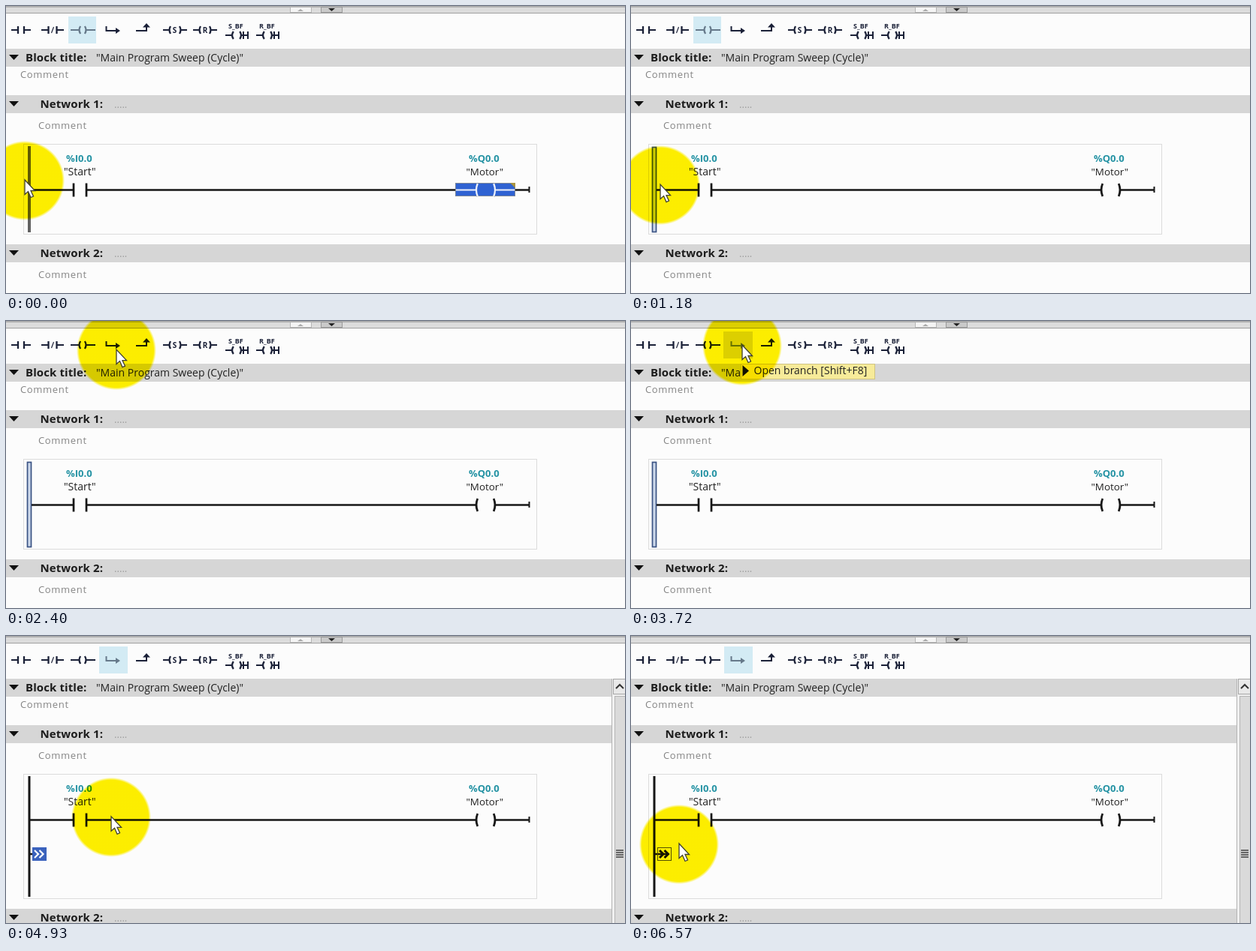
An HTML page with a canvas for the animation above (6.64 s loop, 824 by 383 pixels).

```html
<!DOCTYPE html>
<html lang="en">
<head>
<meta charset="utf-8">
<title>Ladder editor</title>
<style>
html, body { margin: 0; width: 100%; height: 100%; overflow: hidden; background: #fcfcfc; }
canvas { display: block; width: 824px; height: 383px; }
</style>
</head>
<body>
<canvas id="stage" width="824" height="383"></canvas>
<script>
const ctx = document.getElementById('stage').getContext('2d');
const LOOP = 6640;
const STEP = 133;
const INK = '#1b2138';
const BLACK = '#161616';
const FADED = '#66798a';
const BUTTON = '#d3ebf4';
const FONT = '"Open Sans", "Noto Sans", sans-serif';
const RUNG_Y = 245.5;

const EVENTS = {
  railSelected: 520, coilButtonOff: 2270, branchHover: 2530,
  tipOn: 2940, branchAdded: 4250, branchClicked: 5460
};

// Places the pointer visits: at the rail, on the toolbar, over the rung, at the branch
const STOPS = [
  { at: 0, x: 25, y: 232 },
  { at: 1180, x: 39, y: 238 },
  { at: 1860, x: 48, y: 260 },
  { at: 2400, x: 147, y: 38 },
  { at: 3720, x: 148, y: 32 },
  { at: 4450, x: 148, y: 36 },
  { at: 4930, x: 140, y: 241 },
  { at: 5710, x: 53, y: 299 },
  { at: 6500, x: 64, y: 277 }
];

const ease = k => k * k * (3 - 2 * k);

function pointerAt(t) {
  const i = STOPS.findIndex(s => s.at > t);
  if (i < 0) return STOPS[STOPS.length - 1];
  const a = STOPS[i - 1], b = STOPS[i];
  const k = ease((t - a.at) / (b.at - a.at));
  return { x: a.x + (b.x - a.x) * k, y: a.y + (b.y - a.y) * k };
}

function rect(x, y, w, h, color) {
  ctx.fillStyle = color;
  ctx.fillRect(x, y, w, h);
}

function frame(x, y, w, h, color, width = 1) {
  ctx.strokeStyle = color;
  ctx.lineWidth = width;
  ctx.strokeRect(x, y, w, h);
}

function trace(pts) {
  ctx.beginPath();
  for (let i = 0; i < pts.length; i += 2) ctx.lineTo(pts[i], pts[i + 1]);
}

function line(color, width, ...pts) {
  ctx.strokeStyle = color;
  ctx.lineWidth = width;
  trace(pts);
  ctx.stroke();
}

function poly(color, ...pts) {
  ctx.fillStyle = color;
  trace(pts);
  ctx.fill();
}

// Triangle centred on x, its tip at y + h (negative h points up)
function wedge(x, y, half, h, color) {
  poly(color, x - half, y, x + half, y, x, y + h);
}

function text(str, x, y, size, color = '#222', weight = 400, spacing = 0) {
  ctx.font = `${weight} ${size}px ${FONT}`;
  ctx.letterSpacing = spacing + 'px';
  ctx.fillStyle = color;
  ctx.fillText(str, x, y);
}

// Ladder element: leads from x0 to x1 around a symbol at cx; bow 0 makes a contact
function element(x0, x1, cx, y, { gap, h = 5, bow = 0, color = INK, width = 2 }) {
  line(color, width, x0, y, cx - gap, y);
  line(color, width, cx + gap, y, x1, y);
  ctx.lineWidth = width + 0.3;
  for (const side of [-1, 1]) {
    const x = cx + side * gap;
    ctx.beginPath();
    ctx.moveTo(x - side * bow, y - h);
    ctx.quadraticCurveTo(x + side * bow, y, x - side * bow, y + h);
    ctx.stroke();
  }
}

function topStrip() {
  rect(0, 0, 824, 9, '#dcdcdc');
  rect(0, 0, 824, 2, '#b0b0b0');
  rect(0, 9, 824, 1, '#a0a0a0');
  rect(378, 2, 28, 7, '#f4f4f4');
  frame(378.5, 1.5, 28, 7, '#b5b5b5');
  wedge(392, 7, 4, -3, '#aaa');
  rect(419, 2, 28, 7, '#c9c9c9');
  frame(419.5, 1.5, 28, 7, '#999');
  wedge(433.5, 3, 4.5, 4, '#222');
}

function letterCoil(x, letter) {
  element(x, x + 32, x + 16, 32, { gap: 7.5, bow: 1.5 });
  text(letter, x + 12.8, 36, 10, INK, 700);
}

function fieldCoil(x, label) {
  text(label, x + 4, 30, 9, INK, 700);
  element(x, x + 30, x + 15, 39, { gap: 6, bow: 1.8 });
  for (const bar of [24, 30]) line(INK, 2, x + bar, 34, x + bar, 44);
}

function toolbar(t) {
  const coilOn = t < EVENTS.coilButtonOff;
  const hover = t >= EVENTS.branchHover;
  if (coilOn) rect(83, 14, 37, 36, BUTTON);
  if (t >= EVENTS.branchAdded) rect(124, 14, 38, 36, BUTTON);
  else if (hover) rect(123, 14, 39, 36, '#dcdcdc');

  element(7, 33, 20, 32, { gap: 4 });
  element(47, 77, 62, 32, { gap: 5.5 });
  line(INK, 1.2, 60.5, 36, 63.5, 28);
  element(86, 119, 102, 32, { gap: 4.5, bow: 1.6, color: coilOn ? FADED : INK });

  const open = hover ? FADED : INK;
  line(open, 2, 133.5, 27, 133.5, 33, 148, 33);
  poly(open, 146, 29, 152, 33, 146, 37);
  line(INK, 2, 173, 33, 187, 33, 187, 27);
  wedge(187, 28.5, 5, -5.5, INK);

  letterCoil(209, 'S');
  letterCoil(249, 'R');
  fieldCoil(292, 'S_BF');
  fieldCoil(333, 'R_BF');
}

function header(y) {
  rect(0, y, 824, 24, '#d6d6d6');
  wedge(10.5, y + 8, 6.5, 7, '#111');
}

const comment = (x, y) => text('Comment', x, y, 13, '#858585', 400, 0.65);

function network(n, y) {
  header(y);
  text(`Network ${n}:`, 45.5, y + 17, 15, '#1c1c1c', 700, 0.1);
  text('.....', 144, y + 17, 13, '#999');
  comment(43, y + 45);
}

function rail(t) {
  if (t >= EVENTS.branchAdded) rect(29.5, 187, 3, 161, BLACK);
  else if (t < EVENTS.railSelected) rect(29, 187, 4, 115, '#626262');
  else {
    rect(28, 188, 6, 114, '#cbd7ea');
    frame(28.5, 188.5, 5, 113, '#3b5384', 1.7);
  }
}

function rung(t) {
  const coil = { gap: 12.5, h: 8.5, bow: 1.8, color: BLACK, width: 2.4 };
  const start = t >= EVENTS.branchAdded ? 31 : 34;
  element(start, 300, 98.5, RUNG_Y, { gap: 8.5, h: 9, color: BLACK, width: 2.4 });
  element(300, 697, 638.5, RUNG_Y, coil);
  line(BLACK, 2, 696.5, 241, 696.5, 249);

  if (t < EVENTS.railSelected) {
    rect(598, 236, 80, 18, '#2f62d2');
    frame(598.5, 236.5, 79, 17, '#7c8799');
    element(599, 677, 638.5, RUNG_Y, { ...coil, color: '#eef2fb', width: 2 });
    poly('#a8933f', 671, 236, 678, 236, 678, 243);
  }

  text('%I0.0', 80, 208, 13, '#2593a4', 700);
  text('"Start"', 77, 226, 14);
  text('%Q0.0', 616, 208, 13, '#2593a4', 700);
  text('"Motor"', 612.5, 226, 13.4);
}

function branch(t) {
  const clicked = t >= EVENTS.branchClicked;
  line(BLACK, 2.5, 31, 291, clicked ? 50 : 37, 291);
  if (clicked) frame(35.5, 282.5, 18, 17, '#555');
  else rect(35, 282, 19, 18, '#3a62bd');
  for (const x of [38, 44.5]) {
    line(clicked ? BLACK : '#fff', clicked ? 3 : 2.2, x, 286, x + 5, 291, x, 296);
  }
}

function scrollbar() {
  rect(806, 57, 18, 326, '#f0f0f0');
  rect(806, 57, 1, 326, '#b4b4b4');
  rect(808, 58, 16, 20, '#e9e9e9');
  frame(808.5, 57.5, 16, 20, '#a5a5a5');
  line('#333', 2, 812, 70, 817, 65, 822, 70);
  rect(810, 80, 14, 303, '#dadada');
  frame(810.5, 80.5, 14, 310, '#b5b5b5');
  for (let y = 285; y < 295; y += 3) rect(812, y, 10, 2, '#666');
}

function tooltip() {
  rect(146, 57, 179, 20, '#f7eb99');
  frame(146.5, 57.5, 178, 20, '#cfc382');
  poly('#111', 148.5, 59, 157, 66.5, 148.5, 74);
  text('Open branch [Shift+F8]', 163.5, 71, 14);
}

function pointer({ x, y }) {
  ctx.save();
  ctx.translate(x, y);
  ctx.globalCompositeOperation = 'multiply';
  const glow = ctx.createRadialGradient(0, 1, 49.5, 0, 1, 53);
  glow.addColorStop(0, '#fff000');
  glow.addColorStop(1, '#fff00000');
  rect(-54, -54, 108, 110, glow);

  ctx.globalCompositeOperation = 'source-over';
  poly('#fff', 0, 0, 0, 19.5, 4.5, 15.5, 8, 23.5, 11.5, 22, 8, 14.5, 13.5, 14.5);
  ctx.closePath();
  ctx.strokeStyle = '#40402c';
  ctx.lineWidth = 1.3;
  ctx.stroke();
  ctx.restore();
}

function draw(t) {
  const added = t >= EVENTS.branchAdded;
  const shift = added ? 46 : 0;
  rect(0, 0, 824, 383, '#fcfcfc');
  topStrip();
  toolbar(t);

  header(57);
  text('Block title:', 26, 74, 15, '#1c1c1c', 700, 0.1);
  text('"Main Program Sweep (Cycle)"', 120, 74, 14);
  comment(19, 96);
  network(1, 119);
  network(2, 318 + shift);

  frame(23.5, 184.5, 683, 120 + shift, '#dcdcdc');
  rail(t);
  rung(t);
  if (added) {
    branch(t);
    scrollbar();
  } else if (t >= EVENTS.tipOn) {
    tooltip();
  }
  pointer(pointerAt(t));
}

// The screen refreshes in even steps, a little ahead of the clock
function tick() {
  const t = performance.now() % LOOP;
  draw(Math.floor((t + 20) / STEP) * STEP);
  requestAnimationFrame(tick);
}
tick();
</script>
</body>
</html>
```
